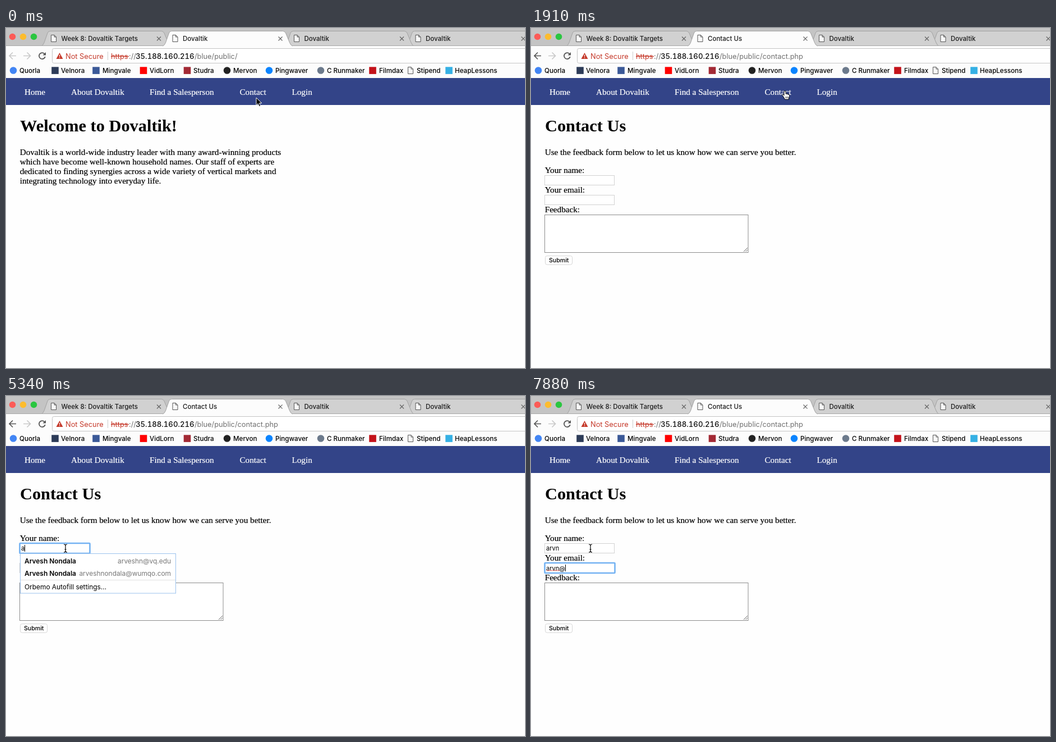
Write an HTML page that moves like this. It is 925 px wide and 605 px high and loops after 8 s.

```html
<!DOCTYPE html>
<html lang="en">
<head>
<meta charset="utf-8">
<title>Contact form</title>
<style>
  html, body { margin: 0; width: 100%; height: 100%; overflow: hidden; background: #fefefe; }
  svg { display: block; width: 925px; height: 605px; }
  text { white-space: pre; }
  .ui { font-family: Inter, "Open Sans", sans-serif; }
  .tab { font-size: 11.5px; font-weight: 500; fill: #1c1c1c; }
  .url { font-size: 12.8px; fill: #707070; }
  .red { fill: #c5392a; }
  .host { font-size: 13.2px; font-weight: 500; fill: #111; font-variant-numeric: tabular-nums; }
  .mark { font-size: 11.6px; font-weight: 500; fill: #000; }
  .body { font: 15.18px "Liberation Serif", serif; fill: #000; stroke: #000; stroke-width: .22; }
  .nav { fill: #fff; stroke: #fff; }
  .head { font: bold 30.36px "Liberation Serif", serif; }
  .field { font-size: 11px; }
  .button { font-size: 10.6px; font-weight: 500; }
  .row { font-size: 11.9px; }
  .bold { font-weight: 600; }
  .hint { fill: #777; text-anchor: end; }
  .line { fill: none; stroke: #666; stroke-width: 1; }
</style>
</head>
<body>
<svg id="stage" viewBox="0 0 925 605" xmlns="http://www.w3.org/2000/svg"></svg>
<script>
const stage = document.getElementById('stage');
const SITE = 'Dovaltik';
const PERSON = 'Arvesh Nondala';
const MAILS = ['arveshn@vq.edu', 'arveshnondala@wumqo.com'];
const SETTINGS = 'Orbemo Autofill settings…';

const text = (x, y, value, cls, id = '') =>
  `<text x="${x}" y="${y}" class="${cls}"${id && ` id="${id}"`}>${value}</text>`;
const rect = (x, y, w, h, fill, more = '') =>
  `<rect x="${x}" y="${y}" width="${w}" height="${h}" fill="${fill}" ${more}/>`;
const circle = (x, y, r, fill) => `<circle cx="${x}" cy="${y}" r="${r}" fill="${fill}"/>`;
const path = (d, more = 'class="line"') => `<path d="${d}" ${more}/>`;
const group = (id, content) => `<g id="${id}">${content}</g>`;
const sheet = (x, y) =>
  path(`M${x} ${y}h5.5l3.5 3.5v8.5h-9zM${x + 5.5} ${y}v3.5h3.5`, 'fill="#fafafa" stroke="#555"');

function tabShape(i, fill) {
  const x = 76 + i * 216.5;
  return path(`M${x - 13} 32Q${x - 10} 31 ${x - 8} 26L${x - 2} 9Q${x - 1} 5.5 ${x + 3} 5.5H${x + 201}` +
    `Q${x + 204} 5.5 ${x + 206} 9L${x + 213} 26Q${x + 215} 31 ${x + 218} 32`, `fill="${fill}" stroke="#a2a2a2"`);
}

function tabLabel(i, title) {
  const x = i * 216.5;
  const icon = sheet(80.5 + x, 12.5);
  return (i === 1 ? group('tabIcon', icon) : icon) +
    text(98.5 + x, 23, title, 'ui tab', `tab${i}`) +
    path(`M${269 + x} 15.5l7 7m0-7l-7 7`, 'class="line" style="stroke-width:1.2"');
}

function browser() {
  const titles = [`Week 8: ${SITE} Targets`, SITE, SITE, SITE];
  return rect(0, 0, 925, 32, '#c4c4c4') +
    circle(11.5, 15.5, 5.8, '#fc5b57') + circle(30.5, 15.5, 5.8, '#fdbc2e') + circle(49.5, 15.5, 5.8, '#2ac640') +
    [3, 2, 0].map(i => tabShape(i, '#d1d1d1')).join('') +
    path('M0 31.5H925', 'stroke="#a8a8a8"') +
    rect(0, 32, 925, 57, '#fcfcfc') + tabShape(1, '#fcfcfc') +
    titles.map((title, i) => tabLabel(i, title)).join('') +
    group('spinner', path('M295.4 18A7 7 0 0 1 308 14.6', 'fill="none" stroke="#8f9bc8" stroke-width="2"')) +
    path('M18 49.5H6.5M12 43.5l-6 6 6 6', 'id="back" fill="none" stroke-width="1.7"') +
    path('M31 49.5H43M37.5 43.5l6 6-6 6', 'fill="none" stroke="#c9c9c9" stroke-width="1.7"') +
    group('reload', path('M69 46.5A5.5 5.5 0 1 0 69.8 51', 'fill="none" stroke="#555" stroke-width="1.8"') +
      path('M71 43v5.5h-5.5z', 'fill="#555"')) +
    path('M59.5 44.5l10 10m0-10l-10 10', 'id="stop" stroke="#555" stroke-width="1.8"') +
    rect(82.5, 36.5, 860, 26, '#fff', 'rx="3" stroke="#c4c4c4"') +
    path('M95.5 44l6 11h-12z', 'fill="#c5392a"') + path('M95.5 47.5v3.5m0 1v1.5', 'stroke="#fff" stroke-width="1.2"') +
    text(106, 54.5, 'Not Secure', 'ui url red') + path('M181.5 42v15', 'stroke="#ccc"') +
    text(187, 54.5, 'https', 'ui url red') + path('M187 50.5h32', 'stroke="#c5392a" stroke-width="1.2"') +
    text(219, 54.5, '://', 'ui url') + text(231, 54.5, '35.188.160.216', 'ui host') +
    text(336, 54.5, '', 'ui url', 'route');
}

function bookmarks() {
  const items = [
    ['Quorla', 24, 13, 'o', '#4285f4'], ['Velnora', 98, 87.5, 's', '#2d3b58'],
    ['Mingvale', 172, 160.5, 's', '#3b5998'], ['VidLorn', 256, 245, 's', '#f00'],
    ['Studra', 334, 323, 's', '#a32a35'], ['Mervon', 405, 394, 'o', '#222'],
    ['Pingwaver', 480, 469, 'o', '#0a84ff'], ['C Runmaker', 572, 561, 'o', '#6c7a8c'],
    ['Filmdax', 665, 653.5, 's', '#c4121a'], ['Stipend', 732, 0, 'doc'],
    ['HeapLessons', 800, 789.5, 's', '#35b0e4']
  ];
  return items.map(([name, x, cx, kind, fill]) => {
    const icon = kind === 'doc' ? sheet(716.5, 69.5)
      : kind === 'o' ? circle(cx, 75.5, 6.3, fill) : rect(cx - 6.3, 69.3, 12.6, 12.6, fill);
    return icon + text(x, 80, name, 'ui mark');
  }).join('');
}

function pages() {
  const links = [['Home', 33], [`About ${SITE}`, 116], ['Find a Salesperson', 256], ['Contact', 416.5], ['Login', 509.5]];
  const intro = [
    `${SITE} is a world-wide industry leader with many award-winning products`,
    'which have become well-known household names. Our staff of experts are',
    'dedicated to finding synergies across a wide variety of vertical markets and',
    'integrating technology into everyday life.'
  ];
  const input = y => rect(24.5, y, 124, 17, '#fff', 'stroke="#d2d2d2"');
  return rect(0, 89, 925, 48, '#334488') +
    links.map(([name, x]) => text(x, 119, name, 'body nav')).join('') +
    group('home', text(25, 184, `Welcome to ${SITE}!`, 'head') +
      intro.map((line, i) => text(24.7, 226 + 17 * i, line, 'body')).join('')) +
    group('contact', text(25, 184, 'Contact Us', 'head') +
      text(24.7, 226, 'Use the feedback form below to let us know how we can serve you better.', 'body') +
      ['Your name:', 'Your email:', 'Feedback:'].map((label, i) => text(24.7, 258 + 35 * i, label, 'body')).join('') +
      input(262.5) + input(297.5) +
      rect(24.5, 332.5, 362.5, 67, '#fff', 'stroke="#8c8c8c"') + path('M379 398l7-7m-3.5 7l3.5-3.5') +
      rect(25.5, 405.5, 48, 15.5, '#fff', 'rx="3" stroke="#d6d6d6"') + text(32, 417, 'Submit', 'ui button') +
      rect(24.5, 262, 125, 18, '#fff', 'id="ring" rx="1" stroke="#74b2f2" stroke-width="2.6"') +
      text(27, 275, '', 'ui field', 'name') + text(27, 310.5, '', 'ui field', 'email') +
      path('M28 310.5h23', 'id="typo" stroke="#e2483d" stroke-width="1.6" stroke-dasharray="1.6 1.2"') +
      rect(0, 265, 1, 12, '#000', 'id="caret"') +
      menu('nameMenu', 0, 302.5, MAILS.map(mail => [PERSON, mail])) +
      menu('emailMenu', 35, 311.5, MAILS.map(mail => [mail, PERSON])));
}

function menu(id, dy, right, rows) {
  return group(id, rect(25.5, 280.5 + dy, right - 25.5, 70.5, '#fff', 'stroke="#9cc3ee"') +
    rows.map(([main, hint], i) => text(33, 297.5 + dy + 22.7 * i, main, 'ui row bold') +
      text(right - 8.5, 297.5 + dy + 22.7 * i, hint, 'ui row hint')).join('') +
    path(`M26 ${327.5 + dy}H${right - 0.5}`, 'stroke="#e0e0e0"') +
    text(33, 344.3 + dy, SETTINGS, 'ui row'));
}

// Pointers are drawn around their hot spot.
function pointers() {
  return group('arrow', path('M0 0V13.5l3.1-2.9 2.2 5 2.4-1-2.2-4.9h4.3z', 'fill="#000" stroke="#fff" stroke-linejoin="round"')) +
    group('hand', path('M-1.5 1Q0-1 1.5 1V5l2 .2 2 .7 2 .8q1 .6 .7 3L7 12.5V15H0L-2.5 10.5-4.7 7.5Q-4 5.6-2.8 6.6L-1.5 8z',
      'fill="#fff" stroke="#000" stroke-linejoin="round"') + path('M1.5 10v3m2-3v3m2-3v3', 'stroke="#000" stroke-width=".7"')) +
    group('beam', path('M-3-7Q0-7 0-5Q0-7 3-7M0-5V5M-3 7Q0 7 0 5Q0 7 3 7M-1.5 2h3', 'fill="none" stroke="#000" stroke-width="1.2"'));
}

stage.innerHTML = rect(0, 0, 925, 605, '#fefefe') + browser() + bookmarks() + pages() + pointers();
const part = Object.fromEntries([...stage.querySelectorAll('[id]')].map(el => [el.id, el]));

const LOOP = 8000;
const start = { pointer: ['arrow', 446, 124], page: 'home', loading: false, name: '', email: '', focus: '', menu: false, caret: false, typo: false };
const steps = [
  [0, {}],
  [140, { pointer: ['hand', 448, 117] }],
  [290, { pointer: ['hand', 449, 114] }],
  [440, { loading: true }],
  [590, { pointer: ['arrow', 444, 128] }],
  [740, { pointer: ['arrow', 425, 148] }],
  [890, { pointer: ['beam', 290, 172] }],
  [1030, { pointer: ['beam', 178, 184] }],
  [1180, { pointer: ['beam', 310, 182] }],
  [1320, { pointer: ['arrow', 385, 156] }],
  [1470, { page: 'contact', loading: false, pointer: ['arrow', 440, 138] }],
  [1620, { pointer: ['hand', 454, 122] }],
  [1760, { pointer: ['hand', 453, 116] }],
  [1910, { pointer: ['hand', 452.5, 112] }],
  [2050, { pointer: ['hand', 447, 116] }],
  [2200, { pointer: ['arrow', 378, 143] }],
  [2350, { pointer: ['beam', 112, 249] }],
  [2500, { pointer: ['beam', 107, 266] }],
  [2650, { pointer: ['beam', 106, 271], focus: 'name' }],
  [2800, { caret: true }],
  [3250, { name: 'ar', menu: true }],
  [3850, { caret: false }],
  [4300, { name: 'avrn', menu: false, caret: true }],
  [4440, { name: 'a', menu: true }],
  [4590, { name: 'ar' }],
  [4740, { name: 'anrv', menu: false }],
  [5340, { name: 'a', menu: true }],
  [5490, { name: 'arv', menu: false }],
  [5640, { name: 'arvn' }],
  [5940, { focus: 'email' }],
  [6380, { email: 'a', menu: true }],
  [6530, { email: 'arvn', menu: false }],
  [7130, { caret: false }],
  [7580, { caret: true }],
  [7730, { email: 'arvn@' }],
  [7880, { typo: true }]
];

let state = start;
const timeline = steps.map(([at, change]) => [at, state = { ...state, ...change }]);

const show = (id, on) => part[id].setAttribute('display', on ? 'inline' : 'none');

function render(index) {
  const s = timeline[index][1];
  const onContact = s.page === 'contact';
  show('home', !onContact);
  show('contact', onContact);
  part.tab1.textContent = onContact ? 'Contact Us' : SITE;
  part.route.textContent = '/blue/public/' + (onContact ? 'contact.php' : '');
  part.back.setAttribute('stroke', onContact ? '#555' : '#c9c9c9');
  show('spinner', s.loading);
  show('stop', s.loading);
  show('tabIcon', !s.loading);
  show('reload', !s.loading);
  part.spinner.setAttribute('transform', `rotate(${(8 - index) * 50} 302 19)`);

  part.name.textContent = s.name;
  part.email.textContent = s.email;
  show('ring', s.focus);
  show('caret', s.focus && s.caret);
  show('typo', s.typo);
  show('nameMenu', s.menu && s.focus === 'name');
  show('emailMenu', s.menu && s.focus === 'email');
  if (s.focus) {
    const dy = s.focus === 'email' ? 35 : 0;
    part.ring.setAttribute('y', 262 + dy);
    part.caret.setAttribute('y', 265 + dy);
    part.caret.setAttribute('x', Math.round(27 + part[s.focus].getComputedTextLength()));
  }

  const [kind, x, y] = s.pointer;
  for (const id of ['arrow', 'hand', 'beam']) show(id, id === kind);
  part[kind].setAttribute('transform', `translate(${x} ${y})`);
}

const origin = performance.now();
let shown = -1;
function tick() {
  const time = (performance.now() - origin) % LOOP;
  const index = timeline.findLastIndex(([at]) => at <= time);
  if (index !== shown) render(shown = index);
  requestAnimationFrame(tick);
}
tick();
</script>
</body>
</html>
```
